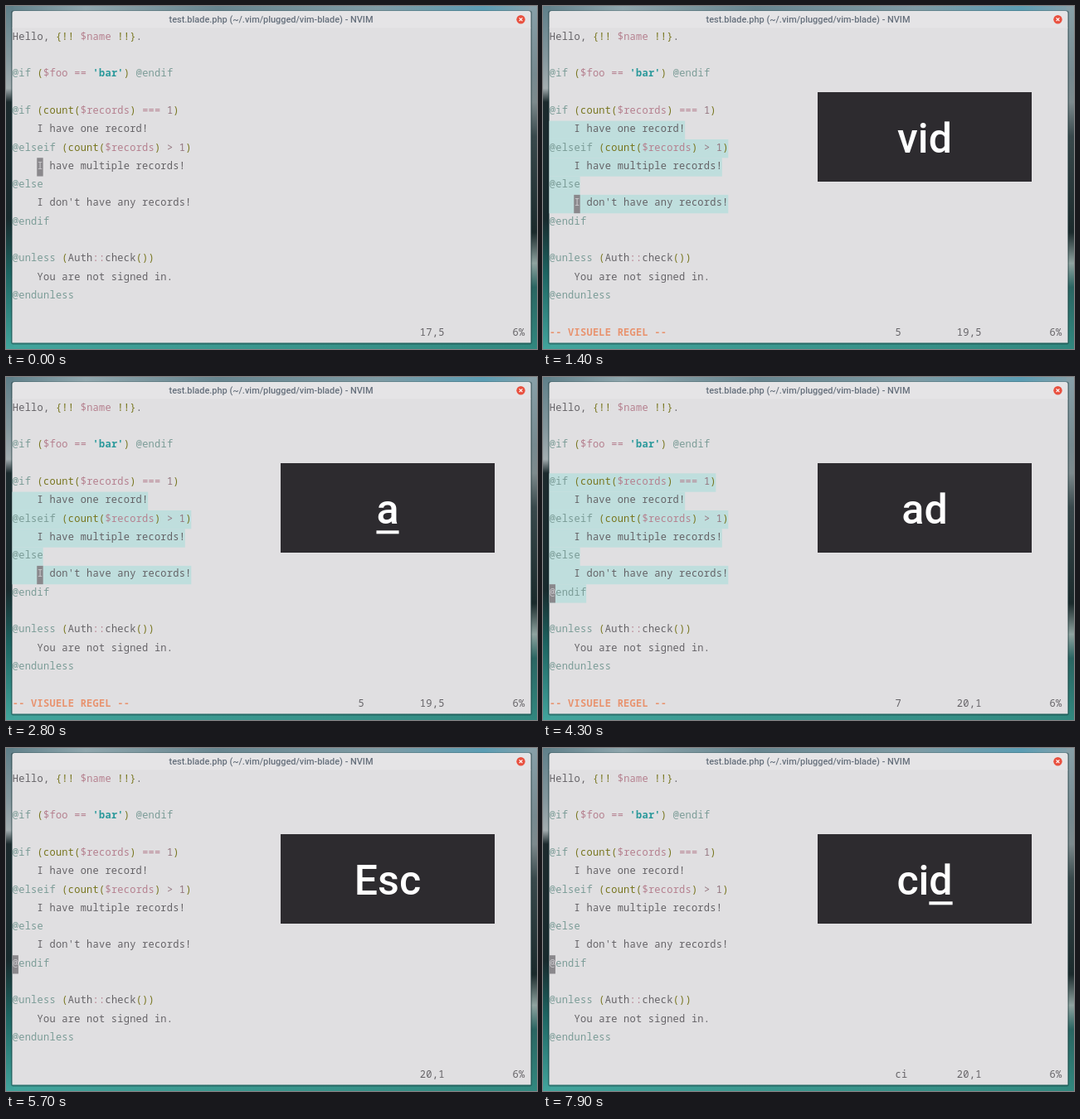
An HTML page for the animation above (8 s loop, 640 px wide and 414 px high).

```html
<!DOCTYPE html>
<html lang="nl">
<head>
<meta charset="utf-8">
<title>Blade text objects</title>
<style>
  html, body { margin: 0; width: 100%; height: 100%; overflow: hidden; background: #14343a; }
  svg { display: block; width: 640px; height: 414px; }
  .code { font: 12px "Noto Sans Mono", monospace; letter-spacing: .24px; white-space: pre; fill: #656367; }
  .dir { fill: #7b9c97; }
  .str { fill: #2a999b; font-weight: 600; }
  .var { fill: #b5808f; }
  .num { fill: #93757f; }
  .fn { fill: #78761f; }
  .mode { fill: #e8936f; font-weight: 700; }
  .title { font: 500 10.95px Roboto, sans-serif; fill: #66707c; text-anchor: middle; }
  .keys { font: 500 50px Roboto, sans-serif; fill: #fff; text-anchor: middle; }
</style>
</head>
<body>
<svg viewBox="0 0 640 414">
  <defs>
    <linearGradient id="sky">
      <stop offset="0" stop-color="#5f7f89"/><stop offset=".15" stop-color="#8fa6ad"/>
      <stop offset=".4" stop-color="#67858f"/><stop offset=".7" stop-color="#7f9ba4"/>
      <stop offset=".9" stop-color="#5b9db4"/><stop offset="1" stop-color="#88a0a8"/>
    </linearGradient>
    <linearGradient id="left" x2="0" y2="1">
      <stop offset="0" stop-color="#5f7f89"/><stop offset=".15" stop-color="#84979d"/>
      <stop offset=".24" stop-color="#a3adb0"/><stop offset=".28" stop-color="#1c2a2d"/>
      <stop offset=".62" stop-color="#182a2d"/><stop offset=".78" stop-color="#1d6562"/>
      <stop offset="1" stop-color="#42a49c"/>
    </linearGradient>
    <linearGradient id="right" x2="0" y2="1">
      <stop offset="0" stop-color="#88a0a8"/><stop offset=".2" stop-color="#76898f"/>
      <stop offset=".28" stop-color="#7d8a8d"/><stop offset=".38" stop-color="#39494c"/>
      <stop offset=".66" stop-color="#1b2a2c"/><stop offset=".75" stop-color="#8fa3a0"/>
      <stop offset=".82" stop-color="#2a6562"/><stop offset="1" stop-color="#31887f"/>
    </linearGradient>
    <linearGradient id="water">
      <stop offset="0" stop-color="#42a49c"/><stop offset=".4" stop-color="#3b988f"/>
      <stop offset="1" stop-color="#31887f"/>
    </linearGradient>
  </defs>
  <rect width="640" height="7" fill="url(#sky)"/>
  <rect y="406" width="640" height="8" fill="url(#water)"/>
  <rect width="9" height="414" fill="url(#left)"/>
  <rect x="631" width="9" height="414" fill="url(#right)"/>
  <rect x="6" y="5.5" width="628" height="403" rx="3" fill="#0c2a2c" opacity=".4"/>

  <path d="M7.5 27V9q0-3 3-3H629.5q3 0 3 3V27z" fill="#e5e4e6"/>
  <rect x="7.5" y="26.5" width="625" height="380" fill="#e0dfe1"/>
  <text class="title" x="319.5" y="20">test.blade.php (~/.vim/plugged/vim-blade) - NVIM</text>
  <circle cx="620.5" cy="16.3" r="5.2" fill="#e9503f"/>
  <path d="M618.6 14.4l3.8 3.8m0-3.8l-3.8 3.8" stroke="#fff" stroke-width="1.2"/>

  <g id="selection" fill="#bfdedd"></g>
  <g id="code"></g>
  <rect id="block" width="7.44" height="22.3" fill="#8a888c"/>
  <text id="glyph" class="code" style="fill:#c9c7cb"></text>
  <text id="mode" class="code mode"></text>
  <text id="command" class="code"></text>
  <text id="ruler" class="code"></text>
  <text id="percent" class="code">6%</text>

  <g id="overlay">
    <rect x="331" y="104" width="258" height="108" fill="#2d2b2f"/>
    <text id="keys" class="keys" x="460" y="177"></text>
    <rect id="underline" y="185.3" height="4" fill="#fff"/>
  </g>
</svg>
<script>
const LOOP = 8000, COL = 7.44, ROW = 22.32, LEFT = 7.5, TOP = 27;
const RECENT = 300, HIDE = 1500;
const $ = id => document.getElementById(id);
const colX = c => LEFT + c * COL;
const rowY = r => TOP + r * ROW;
const textX = c => colX(c) + .3;
const baseline = r => rowY(r) + 13.6;

const lines = `Hello, {!! $name !!}.

@if ($foo == 'bar') @endif

@if (count($records) === 1)
    I have one record!
@elseif (count($records) > 1)
    I have multiple records!
@else
    I don't have any records!
@endif

@unless (Auth::check())
    You are not signed in.
@endunless`.split("\n");

const tokens = /(@\w+)|('[^']*')|(\$\w+|==+|::)|(>|\d)|([(){}]|!!|count)/g;
const kinds = ["dir", "str", "var", "num", "fn"];
const highlight = line => line.replace(tokens, (text, ...groups) =>
  `<tspan class="${kinds[groups.slice(0, kinds.length).findIndex(Boolean)]}">${text.replace(">", "&gt;")}</tspan>`);

$("code").innerHTML = lines.map((line, r) =>
  `<text class="code" x="${textX(0)}" y="${baseline(r)}">${highlight(line)}</text>`).join("");

function place(id, col, row) {
  $(id).setAttribute("x", textX(col));
  $(id).setAttribute("y", baseline(row));
}
place("mode", 0, 16);
place("command", 56, 16);
place("ruler", 66, 16);
place("percent", 81, 16);

// Key presses: time, text shown, length of the newest key label
const presses = [
  [100, "v", 1], [600, "vi", 1], [900, "vid", 1],
  [2800, "a", 1], [3000, "ad", 1],
  [5200, "Esc", 3],
  [7400, "c", 1], [7700, "ci", 1], [7900, "cid", 1]
];

// Editor states: time, cursor row and column, mode, pending command, selected rows
const CHAR = "-- VISUEEL --", LINE = "-- VISUELE REGEL --";
const states = [
  [0, 7, 4, "", ""],
  [200, 7, 4, CHAR, "1"],
  [800, 7, 4, CHAR, "i"],
  [1000, 9, 4, LINE, "5", 5, 9],
  [3000, 9, 4, LINE, "a", 5, 9],
  [3100, 10, 0, LINE, "7", 4, 10],
  [5300, 10, 0, "", ""],
  [7500, 10, 0, "", "c"],
  [7800, 10, 0, "", "ci"]
];

const latest = (list, t) => list.filter(item => item[0] <= t).pop();

function drawEditor([, row, col, mode, command, first, last]) {
  $("selection").innerHTML = lines.map((line, r) => r >= first && r <= last
    ? `<rect x="${LEFT}" y="${rowY(r)}" width="${line.length * COL}" height="${ROW + .1}"/>` : "").join("");
  $("block").setAttribute("x", colX(col));
  $("block").setAttribute("y", rowY(row));
  place("glyph", col, row);
  $("glyph").textContent = lines[row][col];
  $("mode").textContent = mode;
  $("command").textContent = command;
  $("ruler").textContent = `${row + 10},${col + 1}`;
}

function drawKeys(press, t) {
  const age = press ? t - press[0] : HIDE;
  $("overlay").style.display = age < HIDE ? "" : "none";
  if (age >= HIDE) return;
  const [, text, size] = press, keys = $("keys");
  keys.textContent = text;
  const width = keys.getSubStringLength(text.length - size, size);
  $("underline").setAttribute("x", 460 + keys.getComputedTextLength() / 2 - width);
  $("underline").setAttribute("width", width);
  $("underline").style.display = age < RECENT ? "" : "none";
}

const start = performance.now();
function draw(now) {
  const t = Math.max(0, now - start) % LOOP;
  drawEditor(latest(states, t));
  drawKeys(latest(presses, t), t);
  requestAnimationFrame(draw);
}
draw(start);
</script>
</body>
</html>
```
